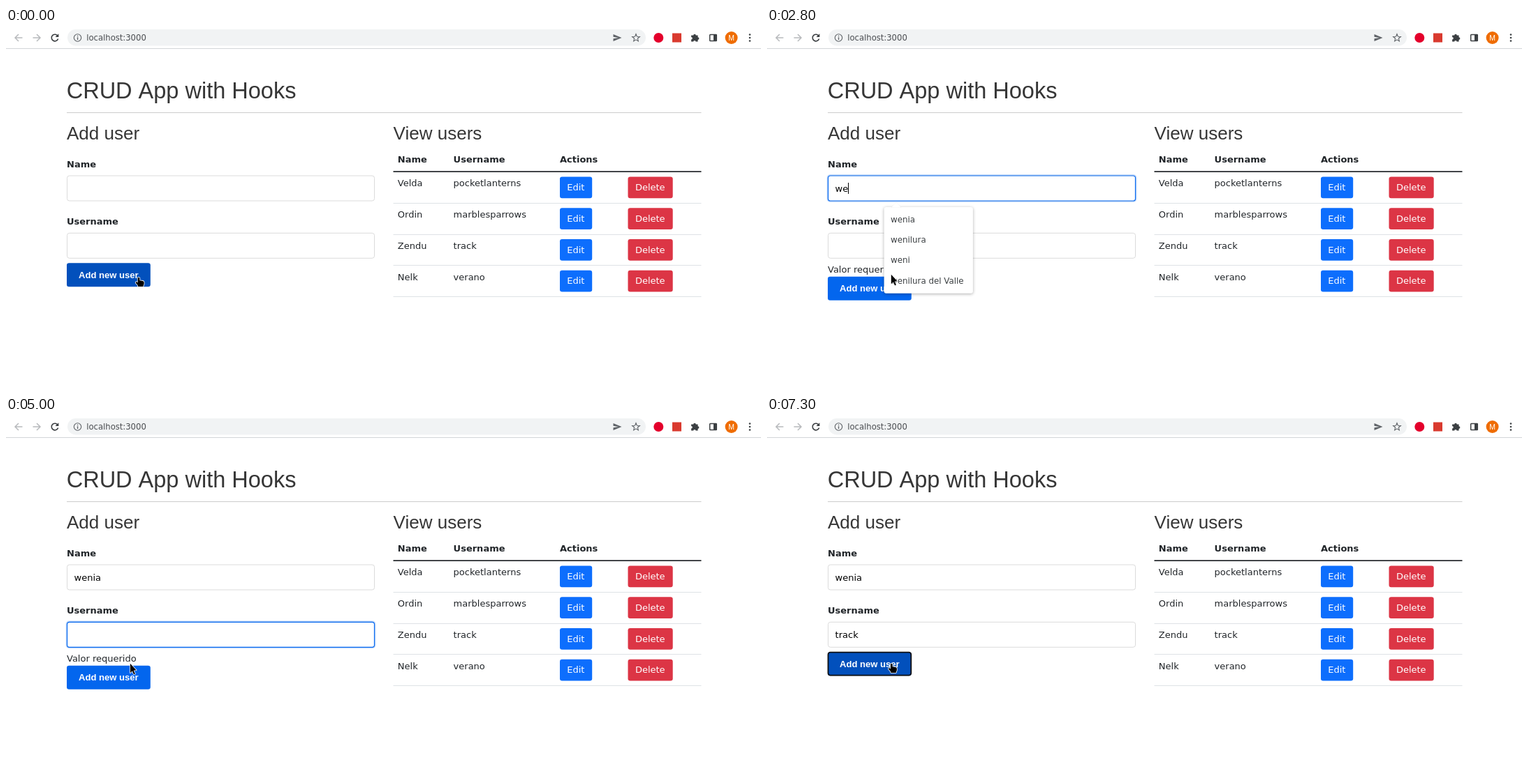
These frames come from a looping animation (1081 by 518 pixels, 8 s). An HTML page with a canvas:

```html
<!DOCTYPE html>
<html lang="en">
<head>
<meta charset="utf-8">
<title>CRUD App with Hooks</title>
<style>
html, body { margin: 0; width: 100%; height: 100%; overflow: hidden; background: #fff; }
canvas { display: block; width: 1081px; height: 518px; }
</style>
</head>
<body>
<canvas id="stage" width="1081" height="518"></canvas>
<script>
const ctx = document.getElementById('stage').getContext('2d');
const LOOP = 8000;
const SANS = '"DejaVu Sans", sans-serif';
const ARIAL = '"Liberation Sans", Arial, sans-serif';
const BLUE = '#0366ee', HOVER = '#0250bc', INK = '#212529';
const FIELD_X = 97.6, LINE = 19.5;

const users = [
  ['Velda', 'pocketlanterns'],
  ['Ordin', 'marblesparrows'],
  ['Zendu', 'track'],
  ['Nelk', 'verano'],
];
const nameHints = ['wenia', 'wenilura', 'weni', 'wenilura del Valle'];
const userHints = ['track', 'tract'];
const allHints = ['tango', ...userHints, 'tulip', 'tabla', 'timon'];

// Each step changes only the listed parts of the state.
const steps = [
  [0, { name: '', user: '', nameErr: false, userErr: false, nameFocus: 0, userFocus: 0,
        caret: '', hints: null, hintW: 0, fade: 1, cursor: 'hand', x: 190, y: 357.7, hover: true, ring: false }],
  [100, { x: 187, y: 356.5 }],
  [200, { x: 181.5, y: 354.7 }],
  [300, { x: 178.3, y: 353.7 }],
  [700, { nameErr: true, userErr: true, nameFocus: .85, caret: 'name', hover: false }],
  [800, { nameFocus: 1, cursor: 'arrow' }],
  [1300, { caret: '' }],
  [1900, { caret: 'name' }],
  [2800, { name: 'we', nameErr: false, hints: nameHints, hintW: 127.3 }],
  [3100, { name: 'wen' }],
  [3600, { name: 'weni' }],
  [3700, { name: 'wenia' }],
  [3800, { fade: .5 }],
  [3900, { hints: null, fade: 1 }],
  [4300, { nameFocus: .3, userFocus: .6, caret: 'user' }],
  [4400, { nameFocus: 0, userFocus: 1 }],
  [5000, { caret: '' }],
  [5300, { user: 't', userErr: false, caret: 'user', hints: allHints, hintW: 59 }],
  [5600, { user: 'tr', hints: userHints }],
  [5800, { user: 'tra' }],
  [6000, { user: 'trac' }],
  [6600, { caret: '' }],
  [6800, { cursor: 'hand' }],
  [6900, { user: 'track', caret: 'user' }],
  [7000, { fade: .5 }],
  [7100, { hints: null, fade: 1, hover: true }],
  [7300, { userFocus: 0, caret: '', ring: true }],
];

function stateAt(t) {
  const s = {};
  for (const [at, change] of steps) if (at <= t) Object.assign(s, change);
  return s;
}

function text(str, x, y, size = 13, color = INK, family = SANS, weight = '') {
  ctx.font = `${weight} ${size}px ${family}`;
  ctx.fillStyle = color;
  ctx.fillText(str, x, y);
}

const bold = (str, x, y) => text(str, x, y, 13, INK, SANS, 'bold');

function rect(x, y, w, h, color) {
  ctx.fillStyle = color;
  ctx.fillRect(x, y, w, h);
}

function box(x, y, w, h, r, fill, stroke, lw = 1) {
  ctx.beginPath();
  ctx.roundRect(x, y, w, h, r);
  if (fill) { ctx.fillStyle = fill; ctx.fill(); }
  if (stroke) { ctx.strokeStyle = stroke; ctx.lineWidth = lw; ctx.stroke(); }
}

function disc(x, y, r, color) {
  ctx.beginPath();
  ctx.arc(x, y, r, 0, Math.PI * 2);
  ctx.fillStyle = color;
  ctx.fill();
}

function drawPath(d, x, y, fill, stroke, lw = 1.4) {
  const p = new Path2D(d);
  ctx.save();
  ctx.translate(x, y);
  if (stroke) { ctx.strokeStyle = stroke; ctx.lineWidth = lw; ctx.stroke(p); }
  if (fill) { ctx.fillStyle = fill; ctx.fill(p); }
  ctx.restore();
}

function drawToolbar() {
  const dark = '#3c4043', grey = '#5f6368', pale = '#b8babd';
  rect(0, 29, 1081, 1, '#d3d5d8');
  box(88, 2, 828, 23.5, 11.75, '#f1f3f4');
  drawPath('M5.5 0H-5M0-5L-5 0L0 5', 18, 14, null, pale, 1.5);
  drawPath('M-5.5 0H5M0-5L5 0L0 5', 44, 14, null, pale, 1.5);
  drawPath('M4.3-2.2A4.8 4.8 0 1 0 4.6 1.5', 70, 14, null, dark, 1.6);
  drawPath('M5.4-5.8V-.9H.5Z', 70, 14, dark);
  ctx.beginPath();
  ctx.arc(102.5, 14, 5.2, 0, 7);
  ctx.strokeStyle = grey;
  ctx.lineWidth = 1.1;
  ctx.stroke();
  rect(101.9, 13.2, 1.3, 3.8, grey);
  rect(101.9, 10.8, 1.3, 1.3, grey);
  text('localhost:3000', 115.3, 18, 11.6, '#4a4d51');
  drawPath('M-5.5-5L6.5 0L-5.5 5V1.2L2 0L-5.5-1.2Z', 875, 14, grey);

  let star = '';
  for (let i = 0; i < 10; i++) {
    const a = -Math.PI / 2 + i * Math.PI / 5, r = i % 2 ? 2.5 : 5.7;
    star += `${i ? 'L' : 'M'}${Math.cos(a) * r} ${Math.sin(a) * r}`;
  }
  drawPath(star + 'Z', 902, 14.3, null, grey, 1.1);

  disc(934.3, 14, 7, '#e4002b');
  rect(954, 7.5, 13, 13, '#d93a2f');
  drawPath('M-5.3-3.5H-2.2A1.8 1.8 0 1 1 1.4-3.5H4.2V-.7A1.8 1.8 0 1 1 4.2 2.9V5.6H1.2A1.7 1.7 0 0 0-2.2 5.6H-5.3V2.5A1.7 1.7 0 0 0-5.3-.9Z', 986.4, 14, dark);
  box(1007.7, 9.4, 9.6, 9.2, .8, null, dark, 1.5);
  rect(1013, 9, 4.6, 10, dark);
  disc(1038.6, 14, 9, '#ef6c00');
  text('M', 1034.3, 17.8, 10.5, '#fff', ARIAL);
  for (const y of [9.5, 14, 18.5]) disc(1065, y, 1.3, dark);
}

function drawTable() {
  text('View users', 554.6, 160, 26, '#363636', ARIAL);
  bold('Name', 560.8, 193);
  bold('Username', 640.6, 193);
  bold('Actions', 793, 193);
  rect(554.5, 205.2, 441, 1.7, INK);
  users.forEach(([name, user], i) => {
    const y = 206.8 + i * 44.78;
    text(name, 560.8, y + 20.5);
    text(user, 640.6, y + 20.5);
    box(793, y + 6.6, 46.2, 30.8, 3.2, '#0d6efd');
    text('Edit', 803.2, y + 26.3, 13, '#fff');
    box(890.5, y + 6.6, 64.2, 30.8, 3.2, '#dc3545');
    text('Delete', 900.9, y + 26.3, 13, '#fff');
    rect(554.5, Math.round(y + 44), 441, 1, '#dee2e6');
  });
}

function drawField(label, y, value, focus, caret) {
  bold(label, 87, y - 12);
  box(87.5, y + .5, 440, 36, 3.3, '#fff', '#dbdbdb');
  if (focus) {
    ctx.save();
    ctx.globalAlpha = focus;
    box(86.3, y - .7, 442.4, 38.4, 4.2, null, 'rgba(3,102,238,.22)', 1.6);
    box(87.5, y + .5, 440, 36, 3.3, '#fff', BLUE, 1.2);
    ctx.restore();
  }
  text(value, FIELD_X, y + 23, 13, '#000');
  if (caret) rect(Math.round(FIELD_X + ctx.measureText(value).width), y + 10.5, 1, 16, '#000');
}

function drawButton(y, hover, ring) {
  box(87, y, 119.8, 34, 3.3, hover ? HOVER : BLUE);
  if (ring) box(87.5, y + .5, 118.8, 33, 3.3, null, '#101010', 1.8);
  text('Add new user', 104, y + 21.3, 13.05, '#fff', ARIAL, 'bold');
}

function drawHints(items, w, y, fade) {
  const h = 7.3 + items.length * 29.1;
  const layer = ctx.globalAlpha;
  ctx.save();
  ctx.globalAlpha = layer * fade;
  if (fade < 1) {
    const cx = 167.6 + w / 2, cy = y + h / 2;
    ctx.translate(cx, cy);
    ctx.scale(.976, .976);
    ctx.translate(-cx, -cy);
  }
  ctx.shadowColor = 'rgba(0,0,0,.32)';
  ctx.shadowBlur = 4;
  ctx.shadowOffsetY = 1;
  box(167.6, y, w, h, 3, '#fff');
  ctx.shadowColor = 'transparent';
  drawPath('M-7 .5L0-6.5L7 .5Z', 185, y, '#fff', 'rgba(0,0,0,.05)', .8);
  items.forEach((item, i) => text(item, 177, y + 21.6 + i * 29.3, 11.85, '#3c4043'));
  ctx.restore();
}

const pointers = {
  arrow: 'M-.5 0V13.5L2.5 10.7L4.8 15.7L6.6 14.9L4.4 10.1L8.3 9.6Z',
  hand: 'M-1.4 1Q0-.8 1.4 1V4.6L6 5.2Q7.6 5.5 7.6 7.2V9.5L6.3 13.3H-.8L-1.6 11L-4.3 8Q-4.3 6.2-2.8 6.6L-1.4 7.7Z',
};

function drawPointer(kind, x, y) {
  ctx.lineJoin = 'round';
  drawPath(pointers[kind], x, y, '#000', '#fff', 1.6);
  ctx.lineJoin = 'miter';
}

function draw(t) {
  const s = stateAt(t);
  rect(0, 0, 1081, 518, '#fff');
  drawToolbar();
  text('CRUD App with Hooks', 86.7, 100.7, 32.5, '#363636', ARIAL);
  rect(87, 121, 908.5, 1, '#cbcbcb');
  text('Add user', 87, 160, 26, '#363636', ARIAL);
  drawTable();

  let shift = 0;
  drawField('Name', 211.5, s.name, s.nameFocus, s.caret === 'name');
  if (s.nameErr) {
    text('Valor requerido', 87, 269);
    shift += LINE;
  }
  drawField('Username', 293.8 + shift, s.user, s.userFocus, s.caret === 'user');
  if (s.userErr) {
    text('Valor requerido', 87, 351.2 + shift);
    shift += LINE;
  }
  drawButton(337.2 + shift, s.hover, s.ring);
  if (s.hints) drawHints(s.hints, s.hintW, s.hints === nameHints ? 257 : 339.2, s.fade);
  drawPointer(s.cursor, s.x, s.y);
}

let start;
function tick(now) {
  start ??= now;
  draw((now - start) % LOOP);
  requestAnimationFrame(tick);
}
draw(0);
requestAnimationFrame(tick);
</script>
</body>
</html>
```
